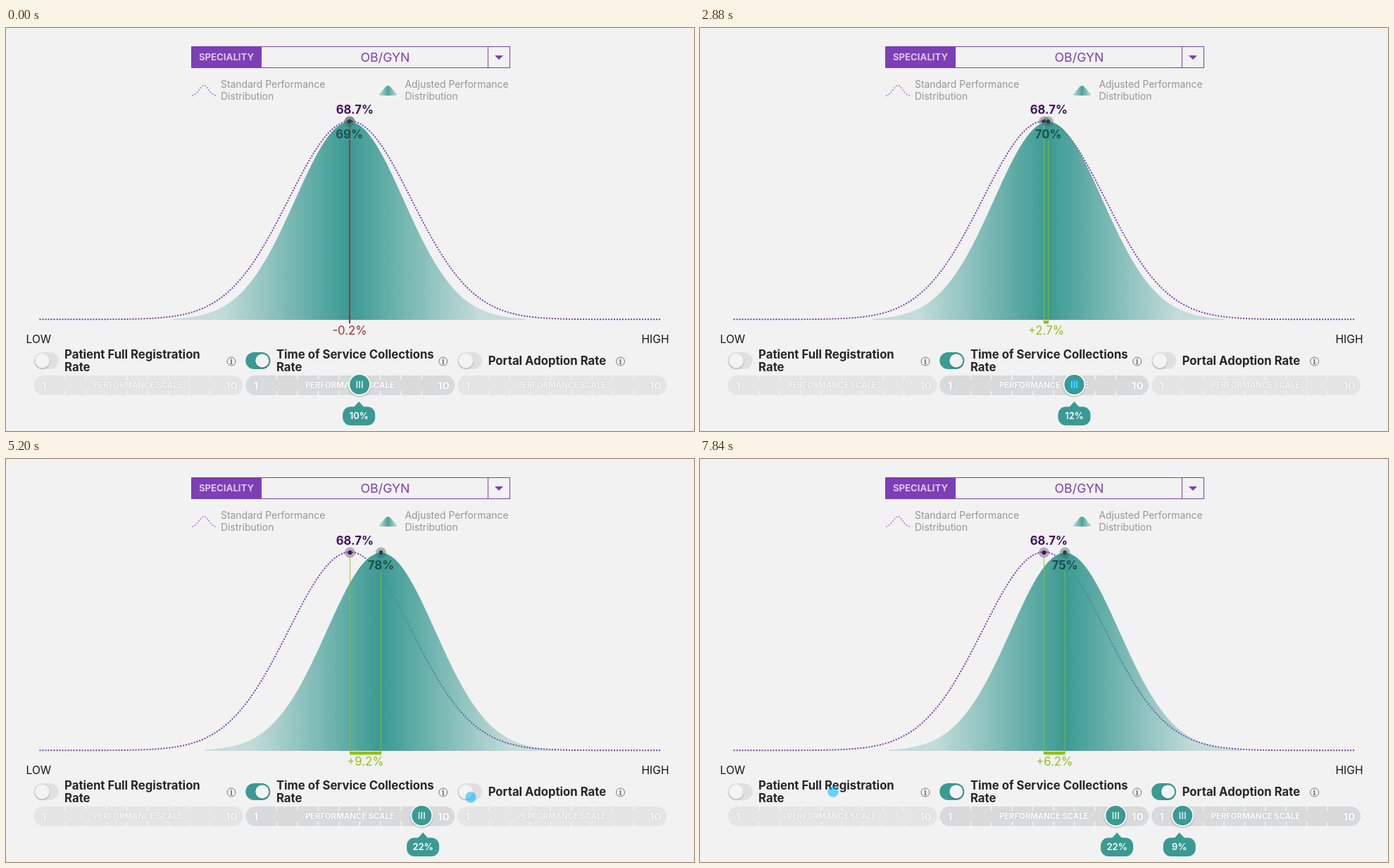
Write an HTML page that moves like this. It is 977 px wide and 573 px high and loops after 8 s.

```html
<!DOCTYPE html>
<html lang="en">
<head>
<meta charset="utf-8">
<title>Performance distribution</title>
<style>
  html, body { margin: 0; width: 100%; height: 100%; overflow: hidden; background: #f2f2f2; }
  svg { display: block; width: 100vw; height: 100vh; font-family: Inter, sans-serif; }
  .mid { text-anchor: middle; }
  .legend { font-size: 13.9px; fill: #969696; }
  .axis { font-size: 15.6px; fill: #151515; }
  .title { font-size: 16.7px; font-weight: 700; fill: #262626; }
  .value { font-size: 16.7px; font-weight: 700; }
  .scale { font-weight: 800; fill: #fafafa; text-shadow: 0 0 2px #b4b4b4; }
  .tip { font-size: 13px; font-weight: 600; fill: #fff; }
  .info { font: 700 10px 'Noto Serif', serif; fill: #666; }
</style>
</head>
<body>
<svg viewBox="0 0 977 573">
  <defs>
    <linearGradient id="bell" gradientUnits="userSpaceOnUse" x1="-185" x2="185" y1="0" y2="0">
      <stop offset="0" stop-color="#3b9a93" stop-opacity=".25"/>
      <stop offset=".5" stop-color="#3b9a93"/>
      <stop offset="1" stop-color="#3b9a93" stop-opacity=".25"/>
    </linearGradient>
    <linearGradient id="miniBell">
      <stop offset="0" stop-color="#3b9a93" stop-opacity=".25"/>
      <stop offset=".5" stop-color="#3b9a93" stop-opacity=".9"/>
      <stop offset="1" stop-color="#3b9a93" stop-opacity=".25"/>
    </linearGradient>
    <filter id="shadow" x="-50%" y="-50%" width="200%" height="200%">
      <feDropShadow dx="0" dy="1" stdDeviation="1.3" flood-opacity=".35"/>
    </filter>
  </defs>

  <g stroke="#7c3fb5" fill="none">
    <rect x="263.5" y="26.5" width="452" height="30"/>
    <path d="M684.5 26.5v30"/>
  </g>
  <path d="M263 26h100v31h-100zM694 39h12l-6 6z" fill="#7c3fb5"/>
  <text class="mid" x="313" y="46.3" font-size="13.2" font-weight="700" fill="#dfc4f2">SPECIALITY</text>
  <text class="mid" x="538.5" y="48" font-size="17.8" fill="#7c3fb5">OB/GYN</text>

  <path id="legendDots" fill="none" stroke="#b784d6" stroke-width="1.8" stroke-dasharray="2 2"/>
  <path id="legendFill" fill="url(#miniBell)"/>
  <g class="legend">
    <text x="305" y="85">Standard Performance</text><text x="305" y="102">Distribution</text>
    <text x="566.5" y="85">Adjusted Performance</text><text x="566.5" y="102">Distribution</text>
  </g>

  <path id="standard" fill="none" stroke="#7436ae" stroke-width="1.9" stroke-dasharray="2 2"/>
  <circle cx="488.5" cy="133" r="7.5" fill="#5f4a66" opacity=".42"/>
  <circle cx="488.5" cy="133" r="2.9" fill="#43105c"/>
  <path id="adjusted" fill="url(#bell)"/>
  <path id="baseLine" d="M488.5 138V418"/>
  <path id="adjustedLine" d="M0 160V418"/>
  <rect id="deltaBar" y="416" height="4.5"/>
  <g id="adjustedPoint">
    <circle cy="133" r="7.5" fill="#3f5c5c" opacity=".42"/>
    <circle cy="133" r="2.9" fill="#1f4648"/>
    <text id="adjustedText" class="value mid" y="157" fill="#1d4f4d"></text>
  </g>
  <text class="value mid" x="495.3" y="122" fill="#43105c">68.7%</text>
  <text id="deltaText" class="mid" y="436" font-size="16.7"></text>
  <text class="axis" x="28.5" y="448">LOW</text>
  <text class="axis" x="941.5" y="448" text-anchor="end">HIGH</text>

  <g id="controls"></g>
  <circle id="cursor" r="7.7" fill="#00b4ff" fill-opacity=".55"/>
</svg>

<script>
const LOOP = 8000, BASE_X = 488.5, PX_PER_PERCENT = 4.78, CURVE_TIME = 480;
const TRACK_Y = 507, STEP_WIDTH = 29.4, TEAL = '#3b9a93';

const sliders = ['Patient Full Registration|Rate', 'Time of Service Collections|Rate', 'Portal Adoption Rate']
  .map((title, i) => ({ id: 'slider' + i, left: 39.5 + 300.8 * i, lines: title.split('|') }));
const [, collections, portal] = sliders;

// A handle moves to a step during start..end; its result appears at shown.
const actions = [
  { slider: collections, start: -2, end: -1, shown: 0, step: 6, tip: '10%', delta: -.2 },
  { slider: collections, start: 2080, end: 2400, shown: 2640, step: 7, tip: '12%', delta: 2.7 },
  { slider: collections, start: 3520, end: 4240, shown: 4400, step: 9, tip: '22%', delta: 9.2 },
  { slider: portal, start: 5360, end: 5520, shown: 5440, step: 6, tip: '30%', delta: 8.8 },
  { slider: portal, start: 6720, end: 7000, shown: 7040, step: 2, tip: '9%', delta: 6.2 }
];

const $ = id => document.getElementById(id);
const set = (id, attrs) => {
  for (const name in attrs) $(id).setAttribute(name, attrs[name]);
};
const mix = (a, b, u) => a + (b - a) * u;
const ease = (t, start, end) => {
  const u = Math.min(1, Math.max(0, (t - start) / (end - start)));
  return u * u * (3 - 2 * u);
};
const stepX = (slider, step) => slider.left + 14.8 + STEP_WIDTH * (step - 1);
const actionsOf = slider => actions.filter(action => action.slider === slider);
const lastShown = (t, list) => list.filter(action => action.shown <= t).pop();

// Points of a normal curve over x in [center - reach, center + reach].
function bell(center, sigma, height, base, reach, step = 1) {
  const points = [];
  for (let d = -reach; d <= reach; d += step) {
    const y = base - height * Math.exp(-d * d / (2 * sigma * sigma));
    points.push((center + d) + ' ' + y.toFixed(2));
  }
  return 'M' + points.join('L');
}

function handleX(slider, t) {
  const list = actionsOf(slider);
  const step = list.reduce((value, a) => mix(value, a.step, ease(t, a.start, a.end)), list[0].step);
  return stepX(slider, step);
}

function sliderMarkup({ id, left, lines }) {
  const ticks = [2, 3, 4, 5, 6, 7, 8, 9].map(n => `M${left + 14.8 + STEP_WIDTH * (n - 1)} 494v6m0 16v6`).join('');
  const single = lines.length === 1;
  const infoX = left + (single ? 231.5 : 280.5);
  const titles = lines.map((line, i) =>
    `<text class="title" x="${left + 43.6}" y="${(single ? 479.3 : 470) + 18 * i}">${line}</text>`).join('');
  return `
    <rect id="${id}Switch" x="${left}" y="461" width="35" height="24" rx="12"/>
    <circle id="${id}Knob" cy="473" fill="#f3f3f3" filter="url(#shadow)"/>
    ${titles}
    <circle cx="${infoX}" cy="474" r="6" fill="none" stroke="#777"/>
    <text class="info mid" x="${infoX}" y="477.6">i</text>
    <rect id="${id}Track" x="${left}" y="494" width="297" height="28" rx="14"/>
    <path d="${ticks}" stroke="#f1f1f1" stroke-width="1.8"/>
    <g id="${id}Scale" class="scale mid">
      <text x="${left + 14.5}" y="513.5" font-size="15">1</text>
      <text x="${left + 148}" y="512.2" font-size="11.2">PERFORMANCE SCALE</text>
      <text x="${left + 281}" y="513.5" font-size="15">10</text>
    </g>
    <g id="${id}Handle">
      <circle cy="${TRACK_Y}" r="15.8" fill="#fff" filter="url(#shadow)"/>
      <circle cy="${TRACK_Y}" r="14" fill="${TEAL}"/>
      <path d="M-3.7 502v10M0 502v10M3.7 502v10" stroke="#e4f3f1" stroke-width="1.6"/>
    </g>
    <g id="${id}Tip">
      <path d="M-8 540L0 531L8 540z" fill="${TEAL}"/>
      <rect x="-23" y="538.5" width="46" height="26.5" rx="11" fill="${TEAL}"/>
      <text id="${id}TipText" class="tip mid" y="556.4"></text>
    </g>`;
}

function drawSlider(slider, t) {
  const { id, left } = slider;
  const list = actionsOf(slider);
  const on = list.length ? ease(t, list[0].start, list[0].end) : 0;
  set(id + 'Switch', { fill: on > .4 ? TEAL : '#e0e0e0' });
  set(id + 'Knob', { cx: left + mix(12, 23.5, on), r: mix(10.3, 9.5, on) });
  set(id + 'Track', { fill: on > .4 ? '#d9dadb' : '#e5e5e5' });
  set(id + 'Scale', { opacity: mix(.8, 1, on) });
  set(id + 'Handle', { opacity: on });
  set(id + 'Tip', { opacity: on });
  if (!on) return;
  const { step, tip } = lastShown(t, list) || list[0];
  set(id + 'Handle', { transform: `translate(${handleX(slider, t)})` });
  set(id + 'Tip', { transform: `translate(${stepX(slider, step) + .9 * (step - 7)})` });
  $(id + 'TipText').textContent = tip;
}

function drawChart(t) {
  const { delta } = lastShown(t, actions);
  const percent = actions.reduce(
    (value, a) => mix(value, a.delta, ease(t, a.shown, a.shown + CURVE_TIME)), actions[0].delta);
  const offset = percent * PX_PER_PERCENT;
  const x = BASE_X + offset;
  const color = delta < 0 ? '#a5302f' : '#93c01f';
  const line = { stroke: color, 'stroke-width': 1.2, opacity: delta < 0 ? .9 : .75 };

  for (const id of ['adjusted', 'adjustedPoint', 'adjustedLine']) set(id, { transform: `translate(${x})` });
  set('baseLine', line);
  set('adjustedLine', line);
  set('deltaBar', { x: Math.min(BASE_X, x) - .5, width: Math.abs(offset) + 1, fill: color });
  set('deltaText', { x: BASE_X + offset / 2, fill: color });
  $('adjustedText').textContent = Math.round(68.7 + percent) + '%';
  $('deltaText').textContent = (delta > 0 ? '+' : '') + delta.toFixed(1) + '%';
}

// The cursor rides on one handle, visits the switch, rides on the next handle and leaves.
function drawCursor(t) {
  let x = handleX(collections, t), y = TRACK_Y;
  const glide = (start, end, toX, toY) => {
    const u = ease(t, start, end);
    x = mix(x, toX, u);
    y = mix(y, toY, u);
  };
  glide(4480, 5200, 660, 481);
  glide(5440, 6080, 673, 491);
  glide(6160, 6480, handleX(portal, t), TRACK_Y);
  glide(7120, 7520, 310, 484);
  glide(7600, 7840, 189, 473);
  set('cursor', { cx: x, cy: y, opacity: t < actions[1].start ? 0 : 1 });
}

function draw(t) {
  drawChart(t);
  for (const slider of sliders) drawSlider(slider, t);
  drawCursor(t);
}

set('legendDots', { d: bell(281, 6.5, 15, 96.5, 17) });
set('legendFill', { d: bell(542.5, 6.8, 14, 96, 12.5) + 'V96H530z' });
set('standard', { d: bell(BASE_X, 87, 282, 414.3, 441, 2) });
set('adjusted', { d: bell(0, 77, 281.5, 415, 250, 2) + 'V415H-250z' });
$('controls').innerHTML = sliders.map(sliderMarkup).join('');

const start = performance.now();
function tick() {
  draw((performance.now() - start) % LOOP);
  requestAnimationFrame(tick);
}
tick();
</script>
</body>
</html>
```
